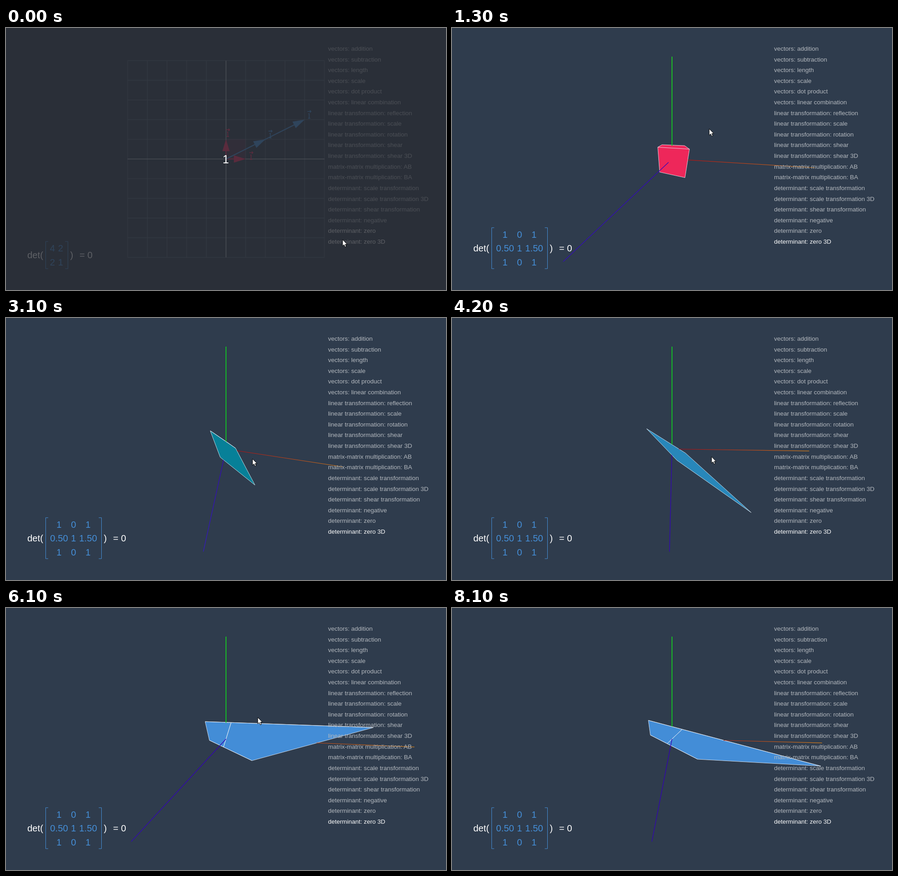
These frames come from a looping animation (970 by 577 pixels, 8500 ms). An HTML page with a canvas:

```html
<!DOCTYPE html>
<html lang="en">
<head>
<meta charset="utf-8">
<title>Determinant: zero 3D</title>
<style>
  html, body { margin: 0; width: 970px; height: 577px; overflow: hidden; background: #2f3c4d; }
  svg, canvas, #shade { position: absolute; left: 0; top: 0; width: 970px; height: 577px; }
  text { font-family: "Liberation Sans", Arial, sans-serif; font-size: 20.25px; fill: #fff; }
  #menu text { font-size: 13.5px; fill: #b4b9bf; }
  #menu text.on { fill: #fff; }
  .num text { fill: #458fd8; text-anchor: middle; }
  .num path { stroke: #458fd8; fill: none; }
  #shade { background: #292b32; }
  .label { fill: none; stroke-width: 1.6; }
</style>
</head>
<body>
<canvas id="view" width="970" height="577"></canvas>
<svg viewBox="0 0 970 577">
  <g id="menu"></g>
  <g id="plane"></g>
  <g id="det2"></g>
  <g id="det3"></g>
</svg>
<div id="shade"></div>
<svg viewBox="0 0 970 577">
  <text id="count" x="484.5" y="297.5" text-anchor="middle" style="font-size:25px">1</text>
  <path id="cursor" d="M0 0V14.2L3.3 11.2L5.6 16.4L8 15.3L5.8 10.4H10Z" fill="#fff" stroke="#000"/>
</svg>
<script>
const $ = id => document.getElementById(id);
const LOOP = 8500, CX = 485, CY = 288.5, FOCAL = 188, AXIS = 8;

// ---- text ----
const group = (head, names) => names.split(", ").map(s => `${head}: ${s}`);
const items = [
  ...group("vectors", "addition, subtraction, length, scale, dot product, linear combination"),
  ...group("linear transformation", "reflection, scale, rotation, shear, shear 3D"),
  ...group("matrix-matrix multiplication", "AB, BA"),
  ...group("determinant", "scale transformation, scale transformation 3D, shear transformation, negative, zero, zero 3D")
];
$("menu").innerHTML = items.map((s, i) =>
  `<text x="710" y="${Math.round(50 + i * 23.61)}">${s}</text>`).join("");
const [zeroItem, zero3dItem] = [...$("menu").children].slice(-2);
zero3dItem.classList.add("on");

function detMarkup(rows, cols, right) {
  const top = 531 - rows.length * 30.4, mid = (top + 530) / 2 + 7;
  const cells = rows.map((row, r) => row.map((v, c) =>
    `<text x="${cols[c]}" y="${top + 22 + r * 30.4}">${v}</text>`).join("")).join("");
  return `<text x="47" y="${mid}">det(</text><text x="${right + 5}" y="${mid}">)</text>
    <text x="${right + 25.5}" y="${mid}">= 0</text>
    <g class="num">${cells}<path d="M93 ${top}H87.5V530H93M${right - 6} ${top}H${right}V530H${right - 6}"/></g>`;
}
$("det2").innerHTML = detMarkup([[4, 2], [2, 1]], [102.5, 120.5], 136.5);
$("det3").innerHTML = detMarkup([[1, 0, 1], ["0.50", 1, "1.50"], [1, 0, 1]], [117, 149, 181], 210.5);

// ---- flat plane with vectors, in grid units ----
function planeMarkup() {
  const red = "#f02c5e", blue = "#458fd8", step = 43.35;
  const line = (i, color) =>
    `<path stroke="${color}" d="M${CX + i * step} 72V505M268 ${CY + i * step}H702"/>`;
  const vector = (x, y, color, dx, dy) => {
    const len = Math.hypot(x, y) * step;
    return `<g transform="translate(${CX} ${CY})" stroke="${color}" fill="${color}">
      <g transform="rotate(${-Math.atan2(y, x) * 180 / Math.PI})"><path d="M0 0H${len - 20}" stroke-width="2"/>
      <path d="M${len} 0l-26 -8v16z" stroke="none"/></g>
      <path class="label" transform="translate(${x * step + dx} ${-y * step + dy})"
        d="M-4 -7H4M1.5 -9.5L4 -7L1.5 -4.5M-2 -2H0V8M-2.5 8H2.5"/></g>`;
  };
  let out = "";
  for (let i = -5; i <= 5; i++) out += line(i, "#5a6878");
  return out + line(0, "#d4d7da")
    + `<rect x="485" y="245" width="43.4" height="43.4" fill="${red}" opacity=".15"/>`
    + vector(1, 0, red, 12, -7) + vector(0, 1, red, 4, -14)
    + vector(2, 1, blue, 11, -11) + vector(4, 2, blue, 10, -11);
}
$("plane").innerHTML = planeMarkup();

// ---- motion ----
const mix = (a, b, k) => a.map((v, i) => v + (b[i] - v) * k);
const ramp = (t, a, b) => Math.min(1, Math.max(0, (t - a) / (b - a)));
const rgb = c => `rgb(${c.map(Math.round)})`;

// time, azimuth, elevation at the turning points of the drags
const orbit = [
  [1300, 14.3, 13.9], [2700, 10.4, 56.1], [3400, 10.4, 56.1], [4200, 1.08, 50.4],
  [5500, 2.68, 50.3], [6150, 11.9, 9.2], [6800, 13.55, 34.9], [7200, 4.1, 21.4]
];
function angles(t) {
  let pose = orbit[0];
  for (let i = 1; i < orbit.length; i++) {
    if (t > orbit[i - 1][0]) pose = mix(orbit[i - 1], orbit[i], ramp(t, orbit[i - 1][0], orbit[i][0]));
  }
  return pose.slice(1);
}
// five notches of the wheel
const distance = t => 6.55 * Math.pow(.95, 5 * ramp(t, 3100, 3400));

// the pointer walks in, drags the camera, then leaves
function pointer(t) {
  const [theta, phi] = angles(t), early = 1 - ramp(t, 3100, 3400);
  const drag = [574 - theta / .59 - 13 * early, 220 + phi / .59 - 5 * early];
  const enter = mix([742, 466], [567, 222], ramp(t, 700, 1300));
  return mix(mix(enter, drag, ramp(t, 1300, 1600)), [175, 34], ramp(t, 7600, 7900));
}

const PINK = [238, 39, 90], TEAL = [7, 128, 152], BLUE = [67, 141, 215];
const tint = t => mix(mix(PINK, TEAL, ramp(t, 1300, 3100)), BLUE, ramp(t, 3100, 5120));

// ---- 3D scene ----
const ctx = $("view").getContext("2d");
const dot = (a, b) => a[0] * b[0] + a[1] * b[1] + a[2] * b[2];
const sub = (a, b) => a.map((v, i) => v - b[i]);
const cross = (a, b) => [a[1] * b[2] - a[2] * b[1], a[2] * b[0] - a[0] * b[2], a[0] * b[1] - a[1] * b[0]];

// corner bits give the signs of x, y and z
const corners = [...Array(8).keys()].map(i => [1, 2, 4].map(bit => i & bit ? 1 : -1));
const faceIds = [], edgeIds = [];
for (const [u, v, w] of [[1, 2, 4], [1, 4, 2], [2, 4, 1]]) {
  for (const base of [0, w]) faceIds.push([base, base + u, base + u + v, base + v]);
  for (const base of [0, u, v, u + v]) edgeIds.push([base, base + w]);
}

const axes = [
  { dir: [1, 0, 0], from: [172, 0, 18], to: [212, 128, 28], width: 1.1 },
  { dir: [0, 1, 0], from: [12, 208, 32], to: [30, 216, 28], width: 1.7 },
  { dir: [0, 0, 1], from: [50, 0, 180], to: [56, 56, 212], width: 1.3 }
];

function makeView(t) {
  const [a, b] = angles(t).map(v => v * Math.PI / 180), dist = distance(t);
  const sa = Math.sin(a), ca = Math.cos(a), sb = Math.sin(b), cb = Math.cos(b);
  const right = [ca, 0, -sa], up = [-sa * sb, cb, -ca * sb], out = [sa * cb, sb, ca * cb];
  return {
    dist, out,
    eye: out.map(v => v * dist),
    project(p) {
      const k = FOCAL / (dist - dot(p, out));
      return [CX + dot(p, right) * k, CY - dot(p, up) * k];
    }
  };
}

function hidden(p, view, faces) {
  const ray = sub(p, view.eye), [x, y] = view.project(p);
  return faces.some(f => {
    const s = dot(f.normal, f.toEye) / dot(f.normal, ray);
    return s > 0 && s < .994 && ctx.isPointInPath(f.path, x, y);
  });
}

// strokes the visible runs of a segment
function segment(p, q, n, view, faces, from, to, width) {
  let start = -1;
  ctx.lineWidth = width;
  for (let i = 0; i <= n; i++) {
    const seen = i < n && !hidden(mix(p, q, (i + .5) / n), view, faces);
    if (seen && start < 0) start = i;
    if (!seen && start >= 0) {
      const a = view.project(mix(p, q, start / n)), b = view.project(mix(p, q, i / n));
      const g = ctx.createLinearGradient(...a, ...b);
      g.addColorStop(0, rgb(mix(from, to, start / n)));
      g.addColorStop(1, rgb(mix(from, to, i / n)));
      ctx.strokeStyle = g;
      ctx.beginPath();
      ctx.moveTo(...a);
      ctx.lineTo(...b);
      ctx.stroke();
      start = -1;
    }
  }
}

function drawScene(t) {
  const view = makeView(t), k = ramp(t, 120, 5120);
  const pts = corners.map(([x, y, z]) => [x + k * (y / 2 + z), y, z + k * (x + 1.5 * y)]);
  const faces = faceIds.map(ids => {
    const [a, b, , d] = ids.map(i => pts[i]);
    const path = new Path2D();
    ids.forEach((id, i) => path[i ? "lineTo" : "moveTo"](...view.project(pts[id])));
    path.closePath();
    return { path, normal: cross(sub(b, a), sub(d, a)), toEye: sub(a, view.eye) };
  });
  ctx.save();
  ctx.beginPath();
  ctx.rect(0, 63, 970, 451.5);
  ctx.clip();
  ctx.fillStyle = rgb(tint(t));
  faces.forEach(f => ctx.fill(f.path));
  const white = [236, 241, 247];
  edgeIds.forEach(([a, b]) => segment(pts[a], pts[b], 24, view, faces, white, white, .8));
  for (const ax of axes) {
    // stop short of the eye
    const len = Math.min(AXIS, (view.dist - .15) / dot(ax.dir, view.out));
    segment([0, 0, 0], ax.dir.map(v => v * len), 160, view, faces, ax.from, mix(ax.from, ax.to, len / AXIS), ax.width);
  }
  ctx.restore();
}

function render(t) {
  const flat = t < 200;
  const show = (id, on) => $(id).style.display = on ? "" : "none";
  show("plane", flat);
  show("det2", flat);
  show("det3", !flat);
  show("count", t < 100);
  show("cursor", t < 8100);
  zeroItem.classList.toggle("on", flat);
  $("shade").style.opacity = .75 * (1 - ramp(t, 0, 600));
  $("cursor").setAttribute("transform", `translate(${pointer(t)})`);
  ctx.clearRect(0, 0, 970, 577);
  if (!flat) drawScene(t);
}

let last = -1;
const begin = performance.now();
function tick() {
  // the picture advances ten times a second
  const t = Math.floor((performance.now() - begin) % LOOP / 100) * 100;
  if (t !== last) render(last = t);
  requestAnimationFrame(tick);
}
tick();
</script>
</body>
</html>
```
